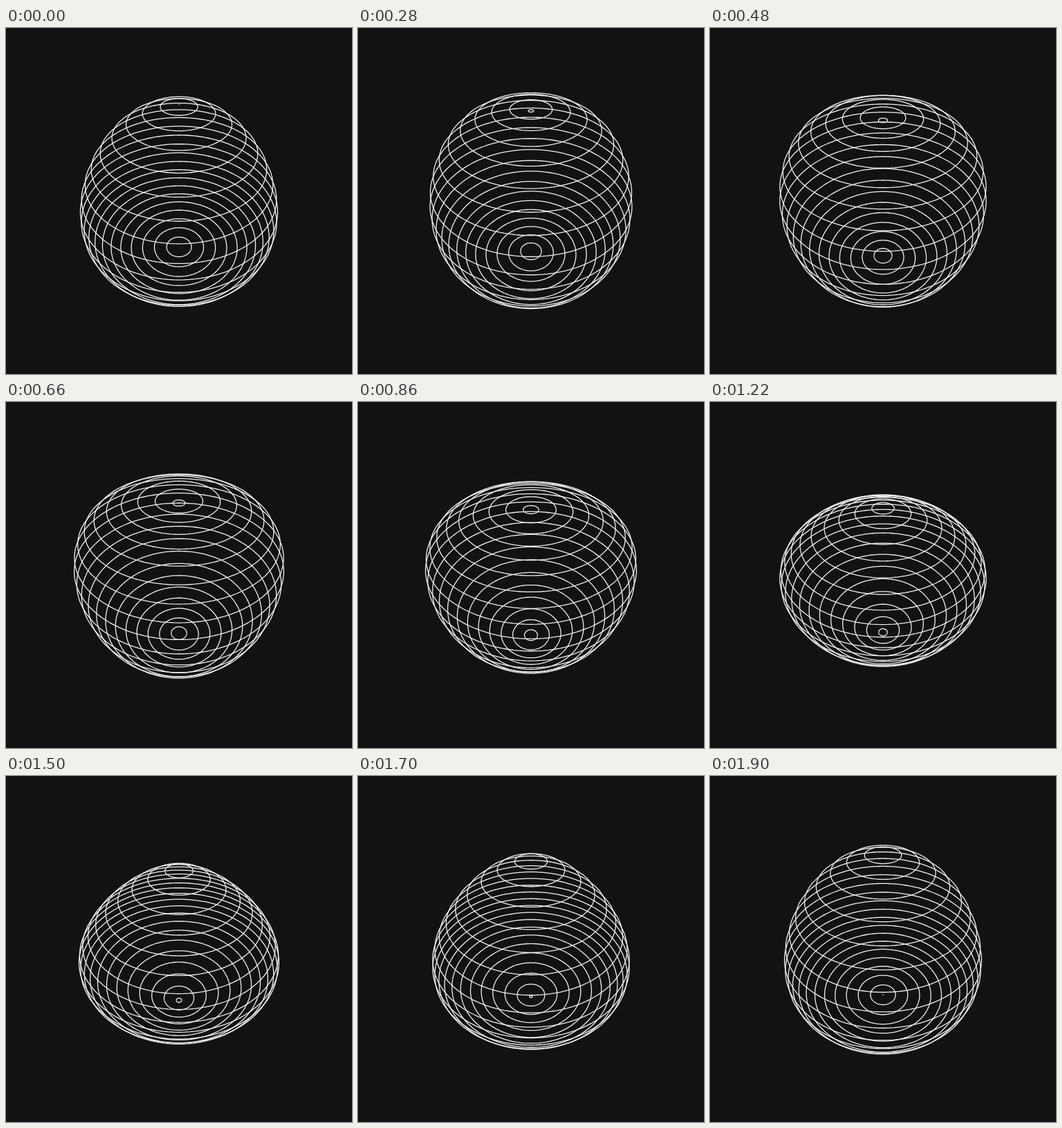
Recreate the animation shown at these times as an HTML page with a canvas. Size 500 by 500 pixels, loop 1920 ms.

```html
<!DOCTYPE html>
<html lang="en">
<head>
<meta charset="utf-8">
<title>Rippling ring sphere</title>
<style>
  html, body { margin: 0; width: 100%; height: 100%; overflow: hidden; background: #121212; }
  canvas { display: block; width: 500px; height: 500px; }
</style>
</head>
<body>
<canvas id="stage" width="500" height="500"></canvas>
<script>
const LOOP = 1920;
const SIZE = 500;
const CENTER = SIZE / 2;
const RINGS = 21;
const RADIUS = 140;
const HEIGHT = 126;      // half the distance between the poles
const WAVE = 20.5;       // how far a ring rides up and down
const CAMERA = 433;      // viewing distance, also the focal length
const TILT = 0.75;
const SEGMENTS = 144;
const TAU = Math.PI * 2;

const sinTilt = Math.sin(TILT);
const cosTilt = Math.cos(TILT);
const ctx = document.getElementById('stage').getContext('2d');

function project(x, up, toward) {
  const y = up * cosTilt - toward * sinTilt;
  const scale = CAMERA / (CAMERA - up * sinTilt - toward * cosTilt);
  return [CENTER + x * scale, CENTER - y * scale];
}

function addRing(radius, up) {
  for (let k = 0; k < SEGMENTS; k++) {
    const a = k / SEGMENTS * TAU;
    const [x, y] = project(radius * Math.cos(a), up, radius * Math.sin(a));
    if (k) ctx.lineTo(x, y);
    else ctx.moveTo(x, y);
  }
  ctx.closePath();
}

function draw(phase) {
  ctx.fillStyle = '#121212';
  ctx.fillRect(0, 0, SIZE, SIZE);
  ctx.strokeStyle = '#f0f0f0';
  ctx.lineWidth = 1.3;
  ctx.lineJoin = 'round';
  // Rings slide from the top pole to the bottom one, one step per loop.
  for (let i = 0; i < RINGS; i++) {
    const along = (i + phase) / RINGS;
    const angle = along * Math.PI;
    const up = HEIGHT * Math.cos(angle) + WAVE * Math.cos(TAU * (phase - along));
    ctx.beginPath();
    addRing(Math.max(0.05, RADIUS * Math.sin(angle)), up);
    ctx.stroke();
  }
}

function tick() {
  draw(performance.now() % LOOP / LOOP);
  requestAnimationFrame(tick);
}
tick();
</script>
</body>
</html>
```
